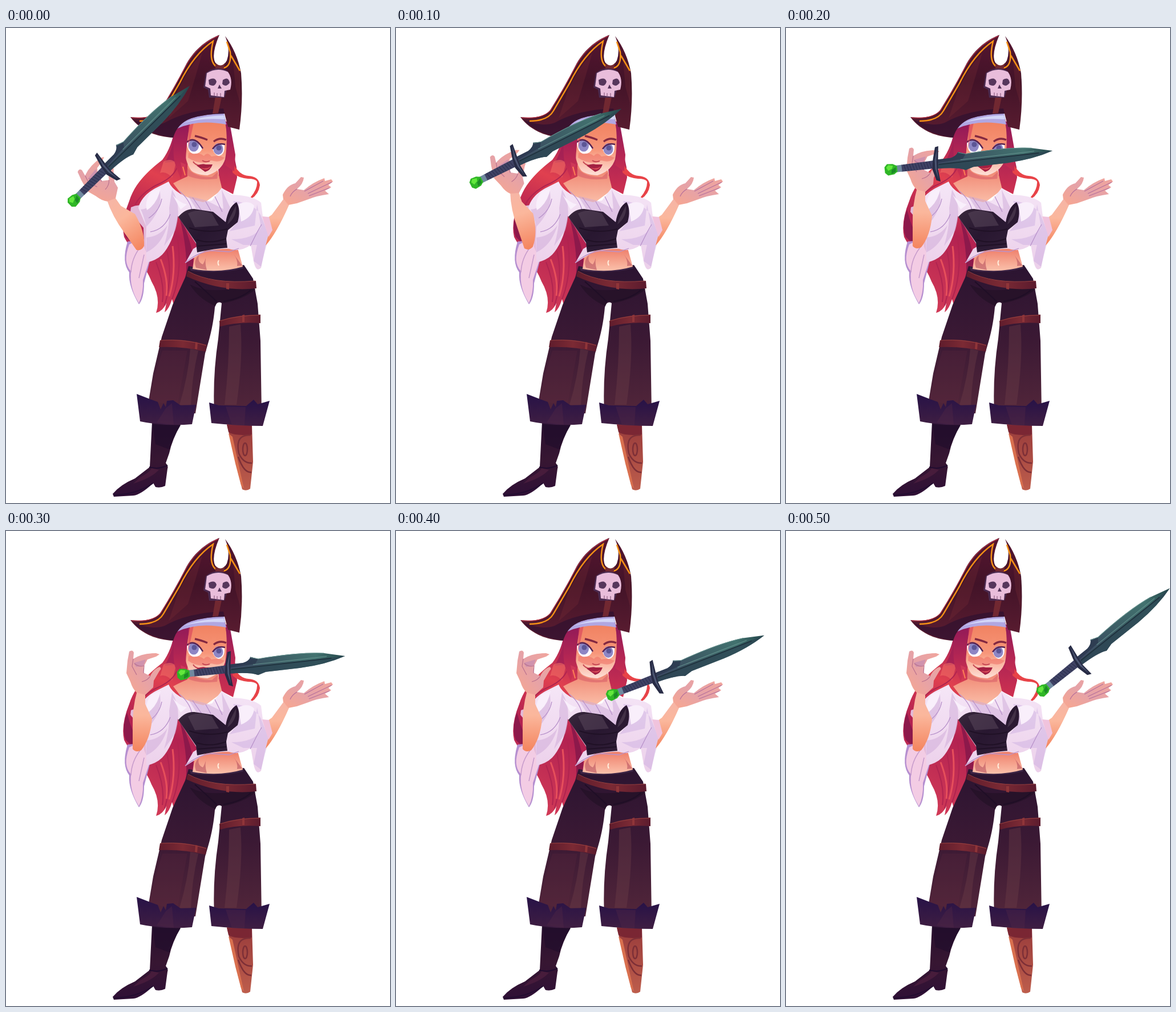
Recreate the animation shown at these times as an HTML page. Size 673 by 832 pixels, loop 0.6 s.

```html
<!DOCTYPE html>
<html lang="en">
<head>
<meta charset="utf-8">
<title>Pirate and sword</title>
<style>
html,body{margin:0;width:100%;height:100%;overflow:hidden;background:#fff}
svg{display:block;width:100%;height:100%}
</style>
</head>
<body>
<svg viewBox="0 0 673 832" xmlns="http://www.w3.org/2000/svg">
<defs>
<linearGradient id="hat" x1="0" y1="0" x2="0" y2="1"><stop offset="0" stop-color="#561530"/><stop offset=".45" stop-color="#421328"/><stop offset="1" stop-color="#5c1d31"/></linearGradient>
<linearGradient id="hair" x1=".6" y1="0" x2=".4" y2="1"><stop offset="0" stop-color="#9c1b58"/><stop offset=".28" stop-color="#e0404f"/><stop offset=".55" stop-color="#b32251"/><stop offset="1" stop-color="#d23b57"/></linearGradient>
<linearGradient id="side" x1="0" y1="0" x2="0" y2="1"><stop offset="0" stop-color="#8f1858"/><stop offset="1" stop-color="#cf3150"/></linearGradient>
<linearGradient id="face" x1="0" y1="0" x2="0" y2="1"><stop offset="0" stop-color="#f0805f"/><stop offset=".55" stop-color="#f79679"/><stop offset=".8" stop-color="#fbc0ae"/><stop offset="1" stop-color="#fde0d8"/></linearGradient>
<linearGradient id="chest" x1="0" y1="0" x2="0" y2="1"><stop offset="0" stop-color="#ee7d69"/><stop offset="1" stop-color="#fbc1ab"/></linearGradient>
<linearGradient id="arm" x1="0" y1="0" x2="0" y2="1"><stop offset="0" stop-color="#f6b5a6"/><stop offset=".4" stop-color="#fbb79c"/><stop offset="1" stop-color="#f4845e"/></linearGradient>
<linearGradient id="palm" x1="1" y1="0" x2="0" y2="1"><stop offset="0" stop-color="#f2a59b"/><stop offset=".5" stop-color="#e5a2a8"/><stop offset="1" stop-color="#f8a78f"/></linearGradient>
<linearGradient id="cloth" x1="0" y1="0" x2="0" y2="1"><stop offset="0" stop-color="#f5e6f7"/><stop offset="1" stop-color="#ecd0ea"/></linearGradient>
<linearGradient id="pants" x1="0" y1="0" x2="0" y2="1"><stop offset="0" stop-color="#2b1431"/><stop offset=".5" stop-color="#3b1934"/><stop offset="1" stop-color="#52263a"/></linearGradient>
<linearGradient id="cuff" x1="0" y1="0" x2="0" y2="1"><stop offset="0" stop-color="#271247"/><stop offset="1" stop-color="#3f1e42"/></linearGradient>
<linearGradient id="strap" x1="0" y1="0" x2="1" y2="0"><stop offset="0" stop-color="#5f1c2c"/><stop offset=".5" stop-color="#7b2a34"/><stop offset="1" stop-color="#5b1b2e"/></linearGradient>
<linearGradient id="boot" x1="0" y1="0" x2="0" y2="1"><stop offset="0" stop-color="#27102f"/><stop offset=".5" stop-color="#371632"/><stop offset="1" stop-color="#2f1036"/></linearGradient>
<linearGradient id="peg" x1="0" y1="0" x2="0" y2="1"><stop offset="0" stop-color="#983b3b"/><stop offset="1" stop-color="#bd5d4c"/></linearGradient>
<linearGradient id="corset" x1="0" y1="0" x2="1" y2="1"><stop offset="0" stop-color="#3b2a3e"/><stop offset=".5" stop-color="#281730"/><stop offset="1" stop-color="#33203a"/></linearGradient>
<linearGradient id="steel" x1="84" y1="0" x2="287" y2="0" gradientUnits="userSpaceOnUse"><stop offset="0" stop-color="#3b4661"/><stop offset=".35" stop-color="#3c5a64"/><stop offset=".75" stop-color="#42726f"/><stop offset="1" stop-color="#24464a"/></linearGradient>
</defs>

<g id="hair-back">
<path fill="url(#hair)" d="M296 174Q291 208 274 231C254 247 227 268 216 303Q201 340 207 366C216 385 247 420 255 444Q272 473 263 499Q275 496 281 482L278 498Q286 492 291 475L297 495Q302 475 309 460L330 417 345 300 320 180Z"/>
<path fill="#8d194b" d="M212 318Q219 348 237 380 222 380 210 366 202 346 212 318M301 320Q331 385 328 417L313 452Q323 400 301 320"/>
<path fill="#a01e54" d="M296 178Q293 212 278 236L300 234 306 262 325 180Z" opacity=".8"/>
<path fill="#f06a63" d="M276 234Q288 227 298 236L291 262Q280 250 270 254Z" opacity=".6"/>
<path fill="none" stroke="#b02450" stroke-width="2" d="M301 240Q296 262 262 276 236 290 226 310M282 390Q293 435 278 486M301 370Q309 430 291 475M263 410Q279 450 274 480"/>
<path fill="none" stroke="#e64f5b" stroke-width="3" d="M292 382Q298 430 286 470M271 405Q285 441 281 469"/>
<path fill="url(#side)" d="M382 165L392 172Q396 208 404 244L405 262 398 291 375 279 372 248Z"/>
<path fill="#e84348" d="M398 236Q408 258 425 259 443 260 445 275 443 291 430 299L429 296Q441 282 440 269 437 264 424 264 405 262 397 253Z"/>
</g>

<g id="legs">
<path fill="url(#boot)" d="M256 690L307 693Q291 721 286 745L280 762Q285 767 283 772L279 802Q271 806 262 804L258 797Q237 817 223 819L189 821 187 816Q200 800 226 789L252 769Z"/>
<path fill="#210e2c" d="M257 695L306 696Q292 718 286 738L262 729Z" opacity=".7"/>
<path fill="none" stroke="#210c30" stroke-width="2" d="M251 769Q267 774 283 766M189 818Q229 817 258 797"/>
<path fill="#5d2745" d="M235 787Q252 778 255 771L268 774Q254 789 223 798Z" opacity=".45"/>
<path fill="url(#peg)" d="M387 693L431 696 433 760 428 807Q421 812 414 808L404 767Z"/>
<path fill="#7a2633" d="M387 695L431 696 431 712Q402 715 390 708Z"/>
<path fill="#d9704f" d="M390 710L397 716 417 807 412 801 402 763Z"/>
<g fill="none" stroke="#7d2f37" stroke-width="2.5"><ellipse cx="419" cy="738" rx="4" ry="11"/><path d="M429 713Q401 711 408 745 416 763 431 762M407 751Q417 780 430 778"/></g>
<path fill="url(#pants)" d="M320 417Q365 427 417 415L433 439 441 483 446 548 448 675 365 675Q362 610 372 544L378 482Q370 477 366 489C363 525 355 550 349 570L332 675 247 671 258 605 273 541 292 485 314 437Z"/>
<path fill="#5e2b3e" d="M274 565L318 565 301 660 251 655Q260 609 274 565" opacity=".25"/>
<path fill="#70414a" d="M323 562L337 565Q326 610 324 661L304 660Q319 611 323 562M391 523L411 519Q416 578 404 660L383 660Q391 590 391 523" opacity=".36"/>
<path fill="#211024" d="M322 449Q338 475 367 487L370 478 381 482Q417 475 437 458 430 443 405 455 354 466 322 449" opacity=".6"/>
<path fill="none" stroke="#1f0e26" stroke-width="2" d="M331 444Q360 470 370 480M381 479Q412 474 429 459"/>
<path fill="#3d2546" d="M322 419Q365 427 414 417L416 421Q375 431 324 425Z"/>
<g fill="url(#strap)"><path d="M318 426Q359 449 438 443L439 456Q378 463 316 435Z"/><path d="M374 513Q404 502 446 502L446 517Q406 514 375 523Z"/><path d="M270 547Q313 543 352 555L350 567Q310 557 268 559Z"/></g>
<path fill="none" stroke="#96403f" d="M319 426Q360 449 437 443M375 513Q406 503 445 503M271 547Q313 544 351 556"/>
<path fill="#8f3539" d="M386 447L391 447 391 458 386 457M414 503L418 502 418 515 414 515M332 550L336 551 335 563 331 562"/>
<g fill="url(#cuff)"><path d="M229 641L255 651 266 655 271 668 276 657 280 664 282 653 293 652 306 661 333 660 326 694Q281 698 235 689Z"/><path d="M356 656L373 661 421 662 434 651 441 659 462 653 450 697Q408 697 360 692Z"/></g>
<path fill="#542a45" d="M280 666L291 657 294 695 264 691M385 663L420 664 418 696 396 696" opacity=".35"/>
</g>

<g id="torso">
<path fill="url(#chest)" d="M318 239L318 260Q302 267 293 272L309 293 344 309 379 283 370 245Z"/>
<path fill="#d9606a" d="M318 245Q331 262 361 261L371 252 370 264Q336 268 317 258Z" opacity=".6"/>
<path fill="url(#chest)" d="M332 388L406 386 415 418Q375 430 327 422Z"/>
<path fill="#b9525f" d="M338 398Q328 407 333 420L352 424Q347 408 352 396 349 408 345 414 335 410 338 398M399 396Q407 406 405 417L414 416Z" opacity=".6"/>
<path fill="none" stroke="#fff0df" stroke-width="2" d="M373 407Q370 411 373 416"/>
<path fill="#b58fd0" d="M213 374Q202 410 216 428 214 452 233 484 242 473 242 447L254 401 246 371Z"/>
<path fill="#f3cce4" d="M216 379Q204 411 219 426 216 456 233 482 241 465 240 441L254 399 240 367Z"/>
<path fill="none" stroke="#c69acb" stroke-width="1.5" d="M236 383Q220 403 219 428M242 397L233 438"/>
<path fill="#e3b9d8" d="M219 314Q237 305 253 319L252 410 242 383 241 350 218 322Z"/>
<path fill="url(#cloth)" d="M285 269Q295 293 345 305L361 302 378 280 395 292Q433 293 447 306L450 330 464 334Q468 351 458 366L447 420Q437 430 433 403L429 380Q409 394 388 386L349 390 314 412 328 387 336 382 301 329Q296 368 278 392 268 406 246 411L245 373 246 348 232 315Q237 295 261 281Z"/>
<path fill="#cba6d6" d="M269 283Q277 316 246 348 240 324 236 318 256 318 269 283M291 283Q309 312 297 354L277 382Q288 345 286 315ZM246 367Q270 365 283 345 273 380 246 393ZM319 294L334 318 355 321 383 342 395 319 378 283 381 317 351 302Z" opacity=".48"/>
<path fill="#c6a6de" d="M398 303Q408 321 405 340L392 356 436 346 440 309 447 349Q435 370 395 370L416 380 440 380 434 408 447 418Q453 392 461 365L449 334Q440 307 398 303" opacity=".42"/>
<path fill="#f9effb" d="M255 286L271 280Q266 307 247 319 242 304 255 286M292 292Q303 306 317 309L306 318ZM407 309Q425 300 435 311 433 331 412 339Z"/>
<path fill="none" stroke="#b892cb" stroke-width="1.3" d="M303 285Q321 299 326 319M327 297L343 320M350 304L359 320M366 295L379 322M253 357Q278 353 288 326M250 333Q269 321 273 299M428 382L440 358 448 344M314 411Q340 390 363 390L391 392 408 386"/>
<path fill="url(#corset)" d="M302 331Q314 316 330 317L363 322 385 340Q390 313 404 305 412 318 406 340L389 354 386 369 388 385Q367 386 335 393L333 376Z"/>
<path fill="#5d4a5e" d="M319 325Q335 315 361 325L373 346 331 349ZM390 337L403 311Q405 331 388 344Z" opacity=".5"/>
<path fill="none" stroke="#201126" stroke-width="2" d="M321 350Q354 361 388 352M334 371Q359 379 386 369M336 382L386 378"/>
</g>

<g id="right-hand">
<path fill="url(#arm)" d="M486 300L466 327 452 337Q470 344 460 361L455 381Q474 360 496 310Z"/>
<path fill="#f0c3dd" d="M449 330L461 331 467 354 460 366Z"/>
<path fill="url(#palm)" d="M486 300L485 292Q493 275 507 272L517 261 522 262Q521 273 510 282L522 284Q538 270 558 263L559 268 570 265 573 269 565 275 570 279 559 285 566 291Q544 294 530 300L510 307 495 310Z"/>
<path fill="none" stroke="#b5709b" stroke-width="1.2" d="M510 282Q501 287 498 295M523 286L556 268M529 290L571 270M531 294L567 280"/>
</g>

<g id="head">
<path fill="url(#face)" d="M322 165L385 160Q389 203 384 230 377 251 353 258 334 257 326 251 317 243 311 209 322 165Z"/>
<path fill="#ee6a60" d="M320 219Q337 217 347 224 353 216 360 225 373 222 383 227 376 237 360 232L350 236Q330 236 319 227Z" opacity=".5"/>
<path fill="#fdf8ff" d="M317 199Q333 190 344 211 340 222 327 220 317 216 317 199M362 212Q370 201 383 205 384 222 373 224 365 222 362 212Z"/>
<g fill="#8d86c4"><ellipse cx="329" cy="206" rx="9" ry="10.5"/><ellipse cx="372" cy="212" rx="8.5" ry="10"/></g>
<g fill="#5b5595"><circle cx="330" cy="204" r="4.5"/><circle cx="373" cy="210" r="4.5"/></g>
<path fill="none" stroke="#562352" stroke-width="2.5" d="M317 200Q331 188 345 211M362 212Q370 200 384 204"/>
<path fill="none" stroke="#842941" stroke-width="3.5" d="M331 189Q341 191 353 196M364 199Q374 191 386 196"/>
<path fill="none" stroke="#c74a55" stroke-width="2" d="M344 232Q349 236 357 233M328 234Q331 240 341 241"/>
<path fill="#a32042" d="M334 241Q344 237 350 239L362 239Q358 250 349 252Z"/>
<path fill="#d84d58" d="M341 245Q351 247 359 243 352 252 341 245"/>
<path fill="url(#side)" d="M297 174L323 165Q315 204 315 239L306 264 297 240Q290 220 297 174M384 163L392 166 402 222 400 251 384 240Q391 201 384 163"/>
<path fill="#d9405d" d="M320 171L329 166 320 208 319 216M306 235L315 239 309 255" opacity=".6"/>
<path fill="none" stroke="#ff8056" stroke-width="2" d="M310 243L314 258"/>
<path fill="#b1a7e2" d="M298 177Q310 150 382 149L386 169Q335 159 298 177Z"/>
<path fill="#d3d6f8" d="M312 166Q340 154 382 153L383 160Q342 157 312 166Z"/>
<path fill="url(#hat)" d="M374 12C349 22 328 40 314 67Q294 106 270 144 257 160 218 156C233 176 257 190 293 192Q300 167 325 158 352 150 383 150L389 173 409 178Q416 128 412 79 405 42 384 14 394 38 387 57 378 73 367 61 359 47 374 12Z"/>
<path fill="#2c1030" d="M224 161Q257 174 278 166 318 143 381 141L383 150Q352 150 325 158 300 167 293 192 244 185 224 161" opacity=".65"/>
<path fill="#8b3237" d="M397 47L411 79 412 138 402 103M301 110Q317 73 344 44 333 83 319 128L285 158Z" opacity=".22"/>
<path fill="none" stroke="#d93a4b" d="M372 14C349 24 329 41 315 67Q295 106 271 144 256 160 220 157"/>
<path fill="none" stroke="#f59116" stroke-width="2.5" d="M234 163Q266 163 276 145L304 97Q329 46 363 23 353 64 374 70 396 73 393 42L387 24M394 48L410 75"/>
<path fill="#712831" d="M367 61Q376 70 384 61L379 82 367 78M367 120L378 121 372 149 362 150Z"/>
<path fill="#4b2a4f" d="M350 79Q366 65 388 75L393 83 386 112 383 122 356 122 354 108 346 104Z"/>
<path fill="#e9bddb" d="M352 79Q370 68 389 77 398 89 393 108L383 110 382 121 359 118 358 106 349 102Z"/>
<path fill="#56365c" d="M355 91Q366 85 369 94 366 105 356 99ZM380 91Q390 84 392 96 385 105 379 98ZM374 99L378 106 371 106Z"/>
<path stroke="#7c4b71" d="M365 113V119M370 114V121M376 114V120"/>
</g>

<g id="arm-left">
<path fill="url(#arm)" d="M230 280Q221 310 222 345L222 382Q228 389 237 384 253 364 256 329L244 303 244 282Z"/>
<path fill="url(#palm)" d="M229 283Q222 277 218 264L211 249 213 227 216 211Q222 207 224 213L223 224Q238 214 263 214L269 216 263 220 248 225 241 238 241 248 253 254Q258 242 269 238 274 240 269 245L259 262 258 274 244 287Z"/>
<path fill="#cf93ae" d="M224 231L245 225 241 236 228 238Z"/>
<path fill="none" stroke="#b9718e" stroke-width="1.2" d="M223 224L221 237 229 252M225 232Q233 239 242 236L241 249M253 254Q248 262 238 264"/>
</g>

<g id="sword">
<path fill="url(#steel)" d="M82-8L108-8Q119-10 122-17L135-12Q205-17 251-9L287 0Q252 11 207 12L146 12 132 16Q118 9 82 8Z"/>
<path fill="#2b4452" d="M82 1L287 0Q252 11 207 12L146 12 132 16Q118 9 82 8Z" opacity=".75"/>
<path fill="#253149" d="M82-8L108-8Q119-10 122-17L135-12 129-4 82-2Z" opacity=".6"/>
<path fill="none" stroke="#64918d" d="M122-16L135-12Q205-16 251-9M125-3L255-3"/>
<path fill="none" stroke="#20333f" stroke-width="2" d="M86 1L263 1"/>
<path fill="#3f4264" d="M20-6L78-7 78 7 20 6Z"/>
<path id="wrap" fill="none" stroke="#2d3050" stroke-width="1.2"/>
<path fill="#7089a0" d="M10-6L21-6 21 6 10 6Z"/>
<path fill="#272b45" d="M89-31L83-30 77-9 74 8 79 28 86 31 84 9 86-8Z"/>
<path fill="#4c5673" d="M87-29L80-8 79 8 83 27 82 8 83-8Z"/>
<path fill="#2fb626" d="M-9-5L-4-10 6-9 13-5 13 5 7 9-4 10-9 5Z"/>
<path fill="#62e83c" d="M-6-4L-2-8 6-6 4-1-3 2Z"/>
<path fill="#1b8c26" d="M3 1L11-3 10 5 2 8Z"/>
</g>
</svg>
<script>
const STEP = 100;
const ELBOW = [236, 375];
// Pommel x, pommel y, blade angle, forearm angle
const poses = [
  [118, 303, -44.7, -35],
  [139, 271, -26.8, -18.6],
  [182, 248, -6.6, 0],
  [309, 251, -6.4, 0],
  [378, 287, -21.3, 0],
  [449, 280, -38.8, 0]
];
const sword = document.getElementById("sword");
const arm = document.getElementById("arm-left");

let wrap = "";
for (let x = 25; x < 74; x += 5) wrap += `M${x}-6L${x + 3} 6`;
document.getElementById("wrap").setAttribute("d", wrap);

function draw(time) {
  const [x, y, turn, bend] = poses[Math.floor(time / STEP) % poses.length];
  sword.setAttribute("transform", `translate(${x} ${y}) rotate(${turn})`);
  arm.setAttribute("transform", `rotate(${bend} ${ELBOW})`);
}

let start;
function tick(now) {
  start ??= now;
  draw(now - start);
  requestAnimationFrame(tick);
}
draw(0);
requestAnimationFrame(tick);
</script>
</body>
</html>
```
